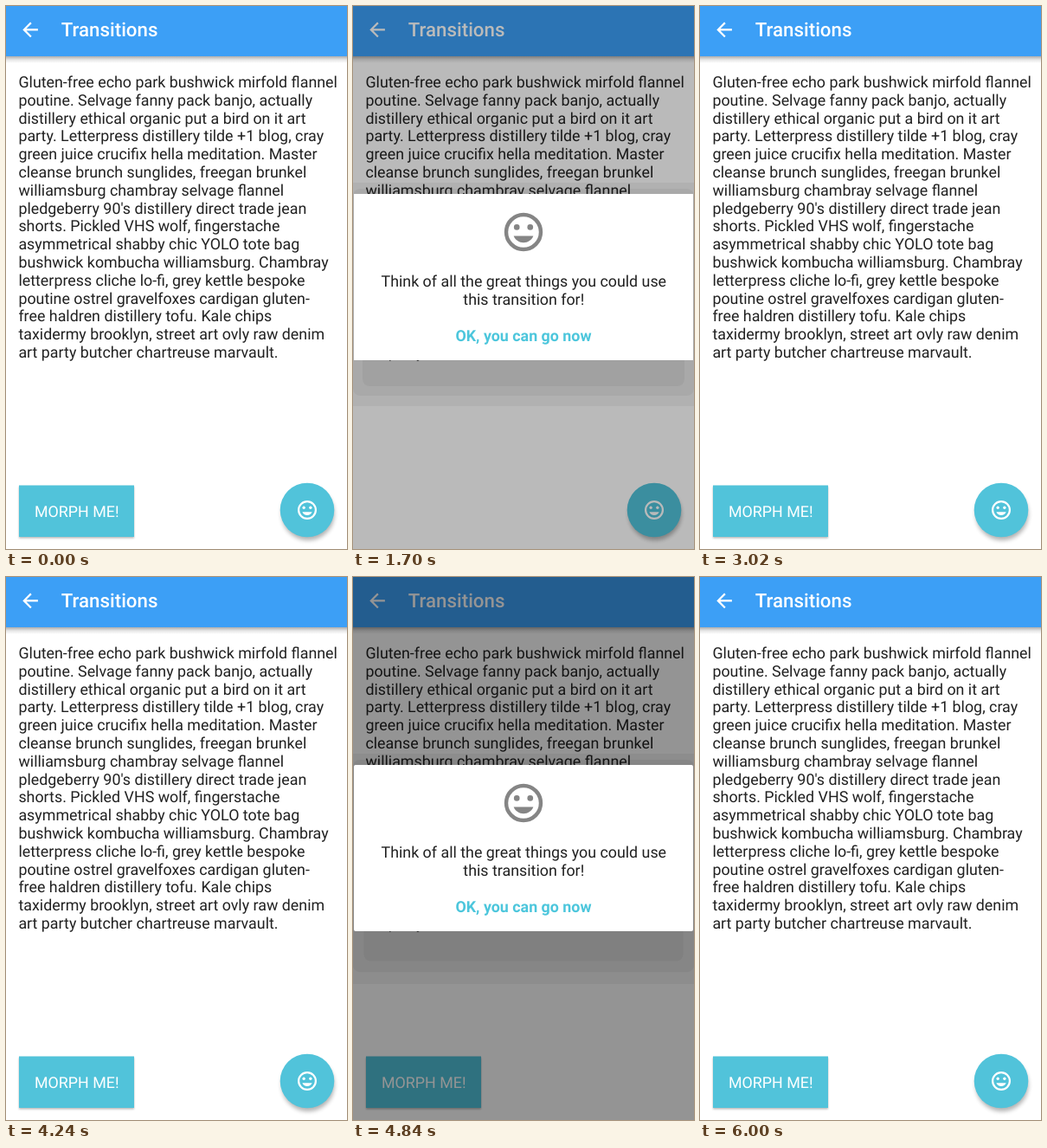
Animation, 394 px wide and 627 px high, one loop 6020 ms. Source, as an HTML page:

```html
<!DOCTYPE html>
<html lang="en">
<head>
<meta charset="utf-8">
<title>Transitions</title>
<style>
  html, body { margin: 0; width: 100%; height: 100%; overflow: hidden; background: #fff; }
  svg { display: block; width: 394px; height: 627px; }
  text { font: 17.85px Roboto, sans-serif; fill: #212121; text-rendering: geometricPrecision; }
  .title { font-size: 22.3px; font-weight: 500; fill: #fff; }
  .mid { text-anchor: middle; }
  .light { fill: #fff; }
  .action { font-weight: 700; fill: #4cc6dc; }
</style>
</head>
<body>
<svg viewBox="0 0 394 627">
  <defs>
    <linearGradient id="barShade" x2="0" y2="1">
      <stop offset="0" stop-opacity=".32"/>
      <stop offset=".5" stop-opacity=".1"/>
      <stop offset="1" stop-opacity="0"/>
    </linearGradient>
    <filter id="soft" x="-30%" y="-30%" width="160%" height="160%"><feGaussianBlur stdDeviation="2.4"/></filter>
    <filter id="thin" x="-10%" y="-10%" width="120%" height="130%"><feGaussianBlur stdDeviation="1"/></filter>
    <clipPath id="buttonClip"><rect x="15" y="553.5" width="133" height="59.5"/></clipPath>
    <clipPath id="fabClip"><circle cx="348" cy="582" r="31.3"/></clipPath>
    <clipPath id="cardClip"><rect id="cardEdge"/></clipPath>
    <g id="smile">
      <circle r="9" fill="none" stroke="currentColor" stroke-width="2"/>
      <g fill="currentColor">
        <circle cx="-3.5" cy="-2.5" r="1.5"/>
        <circle cx="3.5" cy="-2.5" r="1.5"/>
        <path d="M0 5.5C2.33 5.5 4.31 4.04 5.11 2H-5.11C-4.31 4.04 -2.33 5.5 0 5.5z"/>
      </g>
    </g>
  </defs>

  <rect width="394" height="627" fill="#fff"/>
  <g id="story"></g>
  <rect y="58" width="394" height="8" fill="url(#barShade)"/>
  <rect width="394" height="58" fill="#3c9ff6"/>
  <path d="M20 11H7.83l5.59-5.59L12 4l-8 8 8 8 1.41-1.41L7.83 13H20z" fill="#fff" transform="translate(14.9 14.2) scale(1.1)"/>
  <text class="title" x="63.7" y="35.4">Transitions</text>

  <g id="button">
    <rect x="15" y="555" width="133" height="59.5" opacity=".28" filter="url(#thin)"/>
    <rect x="15" y="553.5" width="133" height="59.5" fill="#51c3da"/>
    <circle id="buttonRipple" cx="81.5" cy="583" fill="#fff" clip-path="url(#buttonClip)"/>
    <text class="mid light" x="81.8" y="590.1">MORPH ME!</text>
  </g>

  <g id="fab">
    <circle cx="349" cy="586.5" r="30.5" opacity=".3" filter="url(#soft)"/>
    <circle cx="348" cy="582" r="31.3" fill="#51c3da"/>
    <circle id="fabRipple" cx="348" cy="582" fill="#fff" clip-path="url(#fabClip)"/>
    <use href="#smile" color="#fff" transform="translate(348 582) scale(1.1)"/>
  </g>

  <rect id="dim" width="394" height="627"/>

  <g id="popup">
    <g id="shade"></g>
    <rect id="card"/>
    <g clip-path="url(#cardClip)">
      <g id="content">
        <g><use href="#smile" color="#858585" transform="translate(197 261) scale(2.22)"/></g>
        <g>
          <text class="mid" x="197.3" y="324.4">Think of all the great things you could use</text>
          <text class="mid" x="197.3" y="345.2">this transition for!</text>
        </g>
        <g><text class="mid action" x="197" y="386.6">OK, you can go now</text></g>
      </g>
    </g>
  </g>
</svg>
<script>
const LOOP = 6020;
const MORPH = 300;
const DIALOG = [1, 217, 393, 409];
const STORY = [
  "Gluten-free echo park bushwick mirfold flannel",
  "poutine. Selvage fanny pack banjo, actually",
  "distillery ethical organic put a bird on it art",
  "party. Letterpress distillery tilde +1 blog, cray",
  "green juice crucifix hella meditation. Master",
  "cleanse brunch sunglides, freegan brunkel",
  "williamsburg chambray selvage flannel",
  "pledgeberry 90's distillery direct trade jean",
  "shorts. Pickled VHS wolf, fingerstache",
  "asymmetrical shabby chic YOLO tote bag",
  "bushwick kombucha williamsburg. Chambray",
  "letterpress cliche lo-fi, grey kettle bespoke",
  "poutine ostrel gravelfoxes cardigan gluten-",
  "free haldren distillery tofu. Kale chips",
  "taxidermy brooklyn, street art ovly raw denim",
  "art party butcher chartreuse marvault."
];
const SCENES = [
  { name: "button", box: [15, 553.5, 148, 613], radius: 0, endRadius: 0, reach: 75,
    press: 1080, dimIn: 1280, open: 1365, dimOut: 2600, close: 2690, end: 3000, dim: 0.27, spread: 1 },
  { name: "fab", box: [316.7, 550.7, 379.3, 613.3], radius: 31.3, endRadius: 2, reach: 32,
    press: 4300, dimIn: 4440, open: 4530, dimOut: 5600, close: 5680, end: 5985, dim: 0.42, spread: 1.15 }
];

const $ = id => document.getElementById(id);
const set = (el, attrs) => { for (const k in attrs) el.setAttribute(k, attrs[k]); };
const clamp = x => Math.max(0, Math.min(1, x));
const mix = (a, b, p) => a + (b - a) * p;
const phase = (t, start, length) => clamp((t - start) / length);

function addSvg(parent, tag, attrs) {
  const el = document.createElementNS("http://www.w3.org/2000/svg", tag);
  set(el, attrs);
  return parent.appendChild(el);
}

STORY.forEach((line, i) => {
  addSvg($("story"), "text", { x: 14.4, y: 94.15 + i * 20.78 }).textContent = line;
});
const bands = [0, 1, 2].map(() => addSvg($("shade"), "rect", {}));
const parts = [...$("content").children];

// cubic-bezier(.4, 0, .2, 1)
function ease(x) {
  let lo = 0, hi = 1;
  for (let i = 0; i < 24; i++) {
    const s = (lo + hi) / 2, r = 1 - s;
    if (1.2 * r * r * s + 0.6 * r * s * s + s * s * s < x) lo = s; else hi = s;
  }
  return lo * lo * (3 - 2 * lo);
}

// Point on a shallow arc from a up to b.
function arc(a, b, u) {
  const dx = b[0] - a[0], dy = b[1] - a[1], h2 = dx * dx + dy * dy;
  const mid = [(a[0] + b[0]) / 2, (a[1] + b[1]) / 2];
  const apex = Math.abs(dx) < Math.abs(dy)
    ? [b[0], b[1] + h2 / (2 * Math.abs(dy))]
    : [a[0] + h2 / (2 * dx), a[1]];
  const off = [apex[0] - mid[0], apex[1] - mid[1]];
  const k = 0.235 * Math.sqrt(h2) / 2 / Math.hypot(...off);
  return [0, 1].map(i => mix(a[i], b[i], u) + 1.5 * u * (1 - u) * off[i] * k);
}

function drawPopup(s, t) {
  const leaving = t >= s.close;
  const lin = leaving ? 1 - phase(t, s.close, MORPH) : phase(t, s.open, MORPH);
  const u = leaving ? 1 - ease(1 - lin) : ease(lin);
  const [x, y] = arc(s.box.slice(0, 2), DIALOG.slice(0, 2), u);
  const [right, bottom] = arc(s.box.slice(2), DIALOG.slice(2), u);
  const rx = mix(s.radius, s.endRadius, u);
  const shape = { x, y, width: right - x, height: bottom - y, rx };
  const tint = [77, 208, 225].map(c => Math.round(mix(c, 255, lin)));
  set($("card"), { ...shape, fill: `rgb(${tint})` });
  set($("cardEdge"), shape);

  const lift = Math.sin(Math.PI * u), grow = Math.min(1, u * 3);
  bands.forEach((band, i) => {
    const side = mix([-10, 1, 8][i], [-5, 6, 17][i], lift) * s.spread * grow;
    const drop = mix([30, 41, 53][i], [14, 44, 64][i], lift) * s.spread * grow;
    const top = y - [0, 6, 13][i] * grow * (1 - lift);
    set(band, {
      x: x - side, y: top, width: Math.max(0, right - x + 2 * side),
      height: bottom + drop - top, rx: Math.max(rx, 8), opacity: 0.048 + 0.035 * lift
    });
  });

  set($("content"), { transform: `translate(${x - DIALOG[0]} ${y - DIALOG[1]})` });
  const shown = ease(phase(t, s.open + 150, 150)), gone = phase(t, s.close, 50);
  parts.forEach((part, i) => {
    const shift = leaving ? 64 * gone : 64 * 1.8 ** i * (1 - shown);
    set(part, { opacity: leaving ? 1 - gone : shown, transform: `translate(0 ${shift})` });
  });
}

function draw(t) {
  let dim = 0, active = null;
  for (const s of SCENES) {
    const open = t >= s.open && t < s.end;
    if (open) active = s;
    $(s.name).style.display = open ? "none" : "";
    dim += s.dim * phase(t, s.dimIn, 300) * (1 - phase(t, s.dimOut, s.end - s.dimOut));
    const p = phase(t, s.press, 280);
    set($(s.name + "Ripple"), { r: s.reach * p, opacity: 0.2 * Math.sin(Math.PI * Math.sqrt(p)) });
  }
  set($("dim"), { opacity: dim });
  $("popup").style.display = active ? "" : "none";
  if (active) drawPopup(active, t);
}

const begin = performance.now();
function tick() {
  draw((performance.now() - begin) % LOOP);
  requestAnimationFrame(tick);
}
tick();
</script>
</body>
</html>
```
